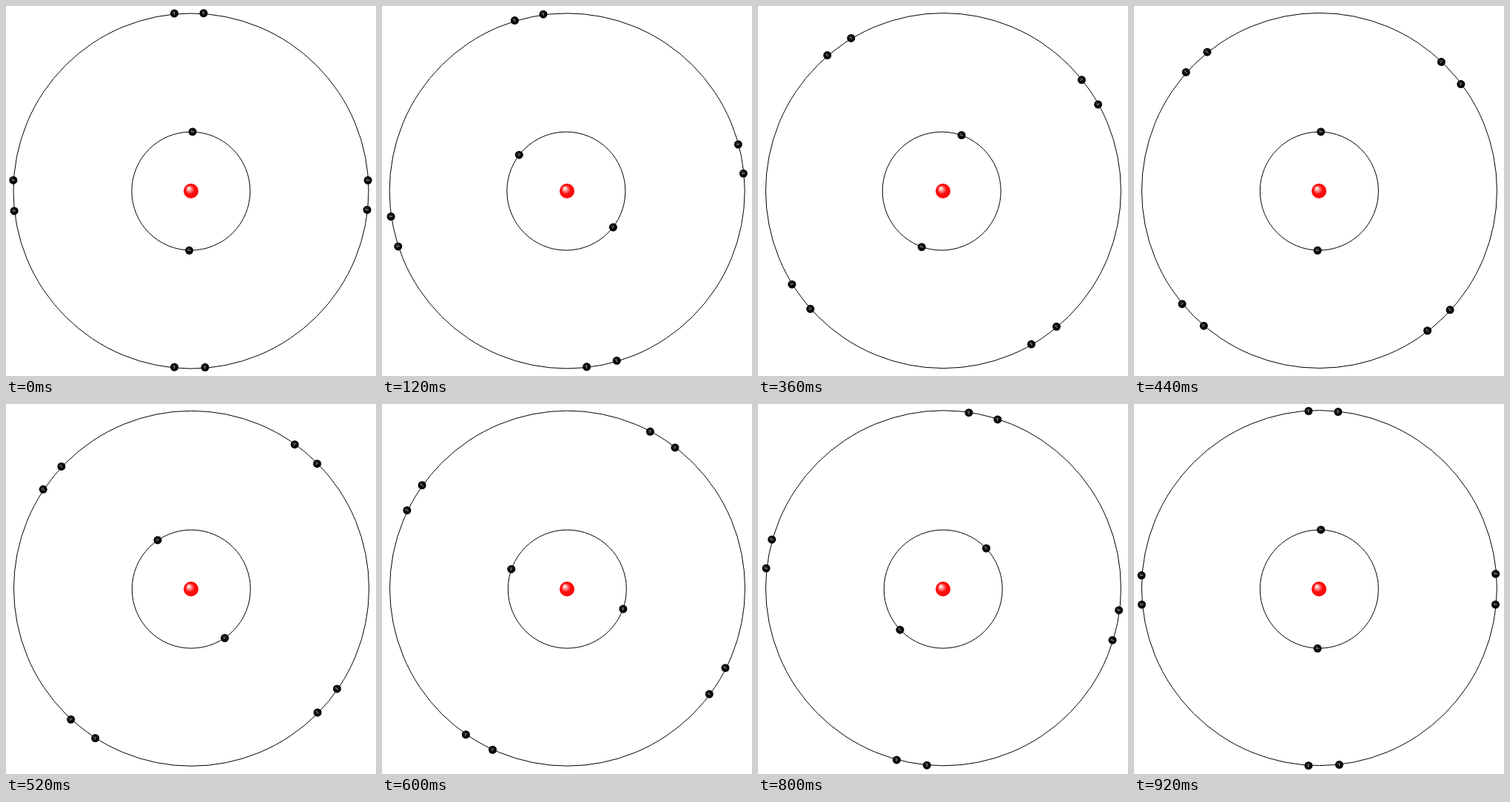
Animation, 500 px wide and 500 px high, one loop 0.96 s. Source, as an HTML page with a canvas:

```html
<!DOCTYPE html>
<html lang="en">
<head>
<meta charset="utf-8">
<title>Electron shells</title>
<style>
  html, body { margin: 0; width: 100%; height: 100%; overflow: hidden; background: #fff; }
  canvas { display: block; }
</style>
</head>
<body>
<canvas id="stage" width="500" height="500"></canvas>
<script>
const ctx = document.getElementById('stage').getContext('2d');
const STEP_MS = 40, STEPS = 24;
const RAD = Math.PI / 180;

// Clockwise angles from the top, in degrees
const outerElectrons = [-5.26, 4.19, 86.75, 96.3, 175.34, 185.25, 263.33, 273.26];

// Inner shell keys: step, counter-clockwise turn, centre x
const innerKeys = [
  [0, 0, 249.9], [5, 90, 248.1], [10, 180, 248.2], [11, 180, 250.3],
  [16, 270, 250.3], [17, 270, 250.1], [23, 360, 250.3]
];

function innerPose(step) {
  const i = Math.max(1, innerKeys.findIndex(key => key[0] >= step));
  const [s0, turn0, x0] = innerKeys[i - 1], [s1, turn1, x1] = innerKeys[i];
  const k = (step - s0) / (s1 - s0);
  return { turn: turn0 + (turn1 - turn0) * k, x: x0 + (x1 - x0) * k };
}

function ball(x, y, r, stops) {
  const g = ctx.createRadialGradient(x - r * 0.35, y - r * 0.4, 0, x, y, r);
  stops.forEach(([at, color]) => g.addColorStop(at, color));
  ctx.fillStyle = g;
  ctx.beginPath();
  ctx.arc(x, y, r, 0, 2 * Math.PI);
  ctx.fill();
}

function ring(x, y, r) {
  ctx.strokeStyle = '#000';
  ctx.lineWidth = 1;
  ctx.beginPath();
  ctx.arc(x, y, r, 0, 2 * Math.PI);
  ctx.stroke();
}

// The minus sign points along signAngle (degrees clockwise from the top)
function electron(cx, cy, r, angle, signAngle) {
  const x = cx + r * Math.sin(angle * RAD), y = cy - r * Math.cos(angle * RAD);
  ball(x, y, 5.5, [[0, '#3a3a3a'], [0.5, '#0c0c0c'], [1, '#000']]);
  const dx = 2 * Math.sin(signAngle * RAD), dy = -2 * Math.cos(signAngle * RAD);
  ctx.strokeStyle = 'rgba(255,255,255,.75)';
  ctx.lineWidth = 0.8;
  ctx.beginPath();
  ctx.moveTo(x - dx, y - dy);
  ctx.lineTo(x + dx, y + dy);
  ctx.stroke();
}

function draw(step) {
  ctx.fillStyle = '#fff';
  ctx.fillRect(0, 0, 500, 500);

  // The outer ring sits slightly off the pivot it turns around
  const turn = 90 * step / 23, px = 249.5, py = 249.1;
  const c = Math.cos(turn * RAD), s = Math.sin(turn * RAD);
  ring(px + 0.5 * c + 0.9 * s, py - 0.5 * s + 0.9 * c, 240);
  outerElectrons.forEach(a => electron(px, py, 240, a - turn, a - turn));

  const inner = innerPose(step);
  ring(inner.x, 250.1, 80);
  for (const a of [1.6, 181.6]) {
    electron(inner.x, 250.1, 80.2, a - inner.turn, a - inner.turn + 90);
  }

  ball(250, 250, 10, [[0, '#fff'], [0.15, '#ffd0d0'], [0.6, '#ff1010'], [1, '#f00']]);
}

function tick() {
  draw(Math.floor(performance.now() / STEP_MS) % STEPS);
  requestAnimationFrame(tick);
}
tick();
</script>
</body>
</html>
```
